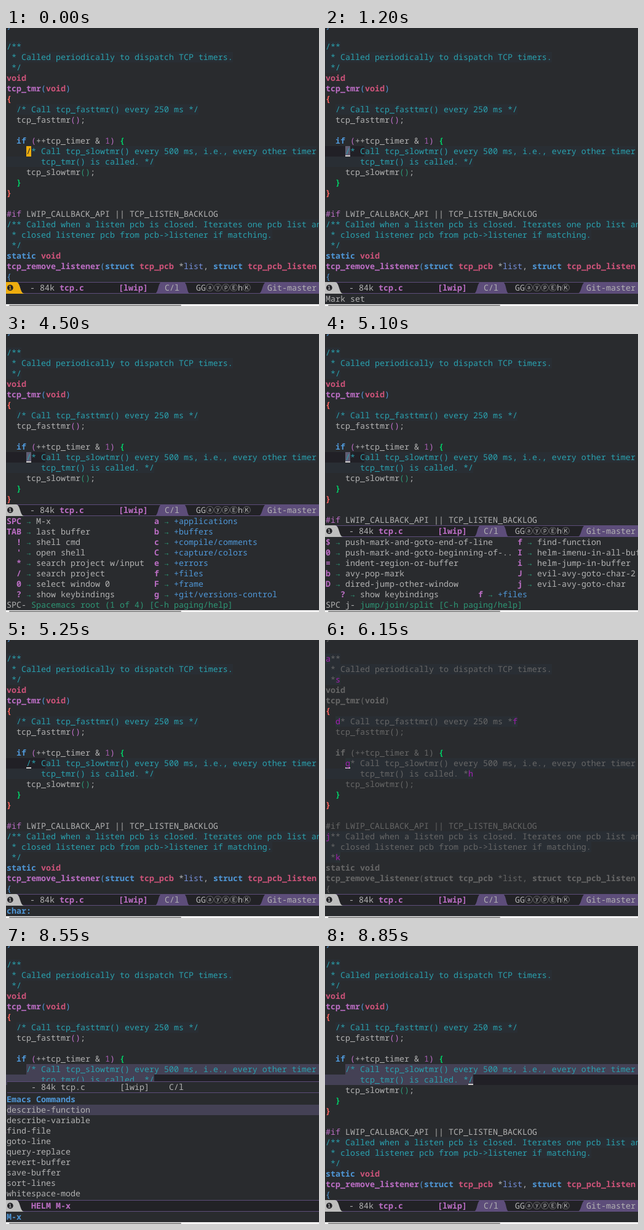
An HTML page that plays this animation: 509 by 452 pixels, repeating every 9460 ms.

```html
<!DOCTYPE html>
<html lang="en">
<head>
<meta charset="utf-8">
<title>Selecting a comment in an editor</title>
<style>
html, body { margin: 0; width: 100%; height: 100%; overflow: hidden; background: #292b2e; }
svg { display: block; width: 509px; height: 452px; }
text {
  font: 13.3333px "Noto Sans Mono", "DejaVu Sans Mono", monospace;
  fill: #b2b2b2; white-space: pre; text-rendering: geometricPrecision;
}
text.k, text.t, text.f, text.G, text.R, text.B { font-weight: bold; }
text.c { fill: #2aa1ae; }
text.k, text.b { fill: #4f97d7; }
text.t { fill: #ce537a; }
text.f, text.p { fill: #bc6ec5; }
text.g { fill: #2d9574; }
text.n { fill: #a45bad; }
text.v { fill: #7590db; }
#avy text { fill: #666; }
#avy text.x { fill: #a31db1; }
text.G, #avy text.G { fill: #00cd66; }
text.R, #avy text.R { fill: #fa645f; }
text.ring { font: 13px "Noto Sans CJK JP", "Noto Sans CJK", "DejaVu Sans", sans-serif; }
text.num { font: 13px "DejaVu Sans", sans-serif; fill: #222226; }
.bg { fill: #292b2e; }
.dark { fill: #222226; }
.line { fill: #212026; }
.edge { fill: #5d4d7a; }
.region { fill: #444155; }
.bar { fill: #d0cccb; }
[data-on] { visibility: hidden; }
#mode { animation: shift 9460ms step-end infinite; }
@keyframes shift {
  0%, 55.496%, 100% { transform: translateY(413px); }
  47.568% { transform: translateY(277px); }
  53.911% { transform: translateY(311px); }
}
</style>
</head>
<body>
<svg viewBox="0 0 509 452">
  <rect class="bg" width="509" height="452"/>
  <g id="shade" fill="#292e34"></g>

  <g data-on="1200-6150">
    <rect class="line" y="192" width="64" height="17"/>
    <rect data-on="1200-5250" x="33" y="192" width="8" height="17" fill="#5f5d73"/>
    <rect class="bar" x="33" y="207" width="8" height="2"/>
  </g>
  <g data-on="6900-9460">
    <path class="region" d="M33 192H509V209H241V226H0V209H33Z"/>
    <rect class="line" x="241" y="209" width="268" height="17"/>
    <rect class="bar" x="233" y="224" width="8" height="2"/>
  </g>

  <g id="code" data-on="0-6150,6900-9460"></g>
  <g id="avy" data-on="6150-6900">
    <g id="leads" fill="#293235"></g>
    <rect class="bar" x="33" y="207" width="8" height="2"/>
  </g>
  <g data-on="0-1200">
    <rect x="33" y="192" width="8" height="17" fill="#eead0e"/>
    <text x="33" y="205" style="fill:#292b2e">/</text>
  </g>

  <g id="root" data-on="4500-5100"><rect class="bg" y="277" width="509" height="155"/></g>
  <g id="jump" data-on="5100-5250"><rect class="bg" y="311" width="509" height="121"/></g>
  <rect class="bg" y="432" width="509" height="20"/>

  <g id="mode">
    <rect class="dark" width="509" height="19"/>
    <path class="edge" d="M0 0H509V1H0ZM0 18H509V19H0Z"/>
    <path class="edge" d="M241 19C249 19 246 0 254 0H288C296 0 293 19 300 19ZM410 19C418 19 416 0 424 0H509V19Z"/>
    <path fill="#bebebe" d="M0 0H16C24 0 22 19 30 19H0Z"/>
    <path data-on="0-1200" fill="#eead0e" d="M0 0H16C24 0 22 19 30 19H0Z"/>
    <text class="num" x="1" y="14">❶</text>
    <text x="39" y="14">- 84k</text>
    <text class="f" x="87" y="14">tcp.c</text>
    <text class="f" x="183" y="14">[lwip]</text>
    <text x="258" y="14">C/l</text>
    <text x="309" y="14">GG</text>
    <text class="ring" x="325" y="14">ⓐⓨⓟⒺ</text>
    <text x="377" y="14">h</text>
    <text class="ring" x="385" y="14">Ⓚ</text>
    <text x="425" y="14">Git-master</text>
  </g>

  <g id="helm" data-on="8550-8700">
    <rect class="bg" x="2" y="220" width="507" height="193"/>
    <path class="edge" d="M2 220H509V221H2ZM2 238H509V239H2Z"/>
    <rect class="region" x="2" y="258" width="507" height="17"/>
    <rect class="dark" x="31" y="414" width="478" height="17"/>
  </g>

  <g id="marked" data-on="1200-4050"></g>
  <g id="spc" data-on="4050-4500"></g>
  <g id="spcRoot" data-on="4500-4800"></g>
  <g id="spcJ" data-on="4800-5100"></g>
  <g id="spcJump" data-on="5100-5250"></g>
  <g id="ask" data-on="5250-6150"></g>
  <g id="quit" data-on="8700-8850"></g>

  <rect y="449" width="509" height="3" fill="#f4f4f4"/>
  <rect x="5" y="450" width="280" height="2" rx="1" fill="#8e8e8e"/>
</svg>
<script>
const LOOP = 9460, COL = 8, ROW = 17;
const $ = id => document.getElementById(id);

function add(parent, tag, attrs, text = '') {
  const el = document.createElementNS('http://www.w3.org/2000/svg', tag);
  for (const name in attrs) el.setAttribute(name, attrs[name]);
  el.textContent = text;
  parent.append(el);
}

// Styled runs are written ~Xtext~, where X is the class.
function block(id, top, source, shades = {}) {
  source.split('\n').forEach((line, row) => {
    let col = 0;
    line.split('~').forEach((part, i) => {
      const cls = i % 2 ? part[0] : '', text = i % 2 ? part.slice(1) : part;
      const x = 1 + col * COL, y = top + row * ROW;
      if (shades[cls])
        add(shades[cls], 'rect', { x, y, width: text.length * COL, height: ROW });
      if (text.trim()) add($(id), 'text', { x, y: y + 13, class: cls }, text);
      col += text.length;
    });
  });
}

block('code', -12, `~b}~

~c/**~
~c * Called periodically to dispatch TCP timers.~
~c */~
~tvoid~
~ftcp_tmr~~b(~~tvoid~~b)~
~R{~
  ~c/* Call tcp_fasttmr() every 250 ms */~
  tcp_fasttmr~p()~;

  ~kif~ ~p(~++tcp_timer & ~n1~~p)~ ~G{~
    ~c/* Call tcp_slowtmr() every 500 ms, i.e., every other timer~
~c       tcp_tmr() is called. */~
    tcp_slowtmr~g()~;
  ~G}~
~R}~

~p#if~ LWIP_CALLBACK_API || TCP_LISTEN_BACKLOG
~c/** Called when a listen pcb is closed. Iterates one pcb list and~
~c * closed listener pcb from pcb->listener if matching.~
~c */~
~kstatic~ ~tvoid~
~ftcp_remove_listener~~b(~~kstruct~ ~ttcp_pcb~ *~vlist~, ~kstruct~ ~ttcp_pcb_listen~
~b{~`, { c: $('shade') });

block('avy', -12, `}

~xa~**
 * Called periodically to dispatch TCP timers.
 *~xs~
~Bvoid~
~Btcp_tmr~(~Bvoid~)
~R{~
  ~xd~* Call tcp_fasttmr() every 250 ms *~xf~
  tcp_fasttmr();

  ~Bif~ (++tcp_timer & 1) ~G{~
    ~xg~* Call tcp_slowtmr() every 500 ms, i.e., every other timer
       tcp_tmr() is called. *~xh~
    tcp_slowtmr();
  ~G}~
~R}~

#if LWIP_CALLBACK_API || TCP_LISTEN_BACKLOG
~xj~** Called when a listen pcb is closed. Iterates one pcb list and
 * closed listener pcb from pcb->listener if matching.
 *~xk~
~Bstatic~ ~Bvoid~
~Btcp_remove_listener~(~Bstruct~ ~Btcp_pcb~ *list, ~Bstruct~ ~Btcp_pcb_listen~
{`, { x: $('leads') });

block('root', 296, `~fSPC~ ~g→~ M-x                     ~fa~ ~g→~ ~b+applications~
~fTAB~ ~g→~ last buffer             ~fb~ ~g→~ ~b+buffers~
  ~f!~ ~g→~ shell cmd               ~fc~ ~g→~ ~b+compile/comments~
  ~f'~ ~g→~ open shell              ~fC~ ~g→~ ~b+capture/colors~
  ~f*~ ~g→~ search project w/input  ~fe~ ~g→~ ~b+errors~
  ~f/~ ~g→~ search project          ~ff~ ~g→~ ~b+files~
  ~f0~ ~g→~ select window 0         ~fF~ ~g→~ ~b+frame~
  ~f?~ ~g→~ show keybindings        ~fg~ ~g→~ ~b+git/versions-control~`);

block('jump', 330, `~f$~ ~g→~ push-mark-and-goto-end-of-line     ~ff~ ~g→~ find-function
~f0~ ~g→~ push-mark-and-goto-beginning-of-.. ~fI~ ~g→~ helm-imenu-in-all-buffers
~f=~ ~g→~ indent-region-or-buffer            ~fi~ ~g→~ helm-jump-in-buffer
~fb~ ~g→~ avy-pop-mark                       ~fJ~ ~g→~ evil-avy-goto-char-2
~fD~ ~g→~ dired-jump-other-window            ~fj~ ~g→~ evil-avy-goto-char
   ~f?~ ~g→~ show keybindings        ~ff~ ~g→~ ~b+files~`);

block('helm', 221, '     - 84k tcp.c       [lwip]    C/l');
block('helm', 241, `~kEmacs Commands~
describe-function
describe-variable
find-file
goto-line
query-replace
revert-buffer
save-buffer
sort-lines
whitespace-mode`);
block('helm', 414, '     ~fHELM M-x~');
block('helm', 432, '~kM-x~ ');

const echo = (id, text) => block(id, 432, text);
echo('marked', 'Mark set');
echo('spc', 'SPC-');
echo('spcRoot', 'SPC- ~gSpacemacs root (1 of 4) [C-h paging/help]~');
echo('spcJ', 'SPC j-');
echo('spcJump', 'SPC j- ~gjump/join/split [C-h paging/help]~');
echo('ask', '~kchar: ~');
echo('quit', 'Quit');

// Turn each data-on list of ms ranges into stepped visibility keyframes.
const sheet = document.createElement('style');
document.querySelectorAll('[data-on]').forEach((el, i) => {
  const key = (ms, state) =>
    `${Math.floor(ms / LOOP * 1e5) / 1e3}%{visibility:${state}}`;
  const steps = el.dataset.on.split(',').map(range => {
    const [from, to] = range.split('-');
    return key(from, 'visible') + key(to, 'hidden');
  });
  sheet.textContent += `@keyframes on${i}{0%,100%{visibility:hidden}${steps.join('')}}`;
  el.style.animation = `on${i} ${LOOP}ms step-end infinite`;
});
document.head.append(sheet);
</script>
</body>
</html>
```
